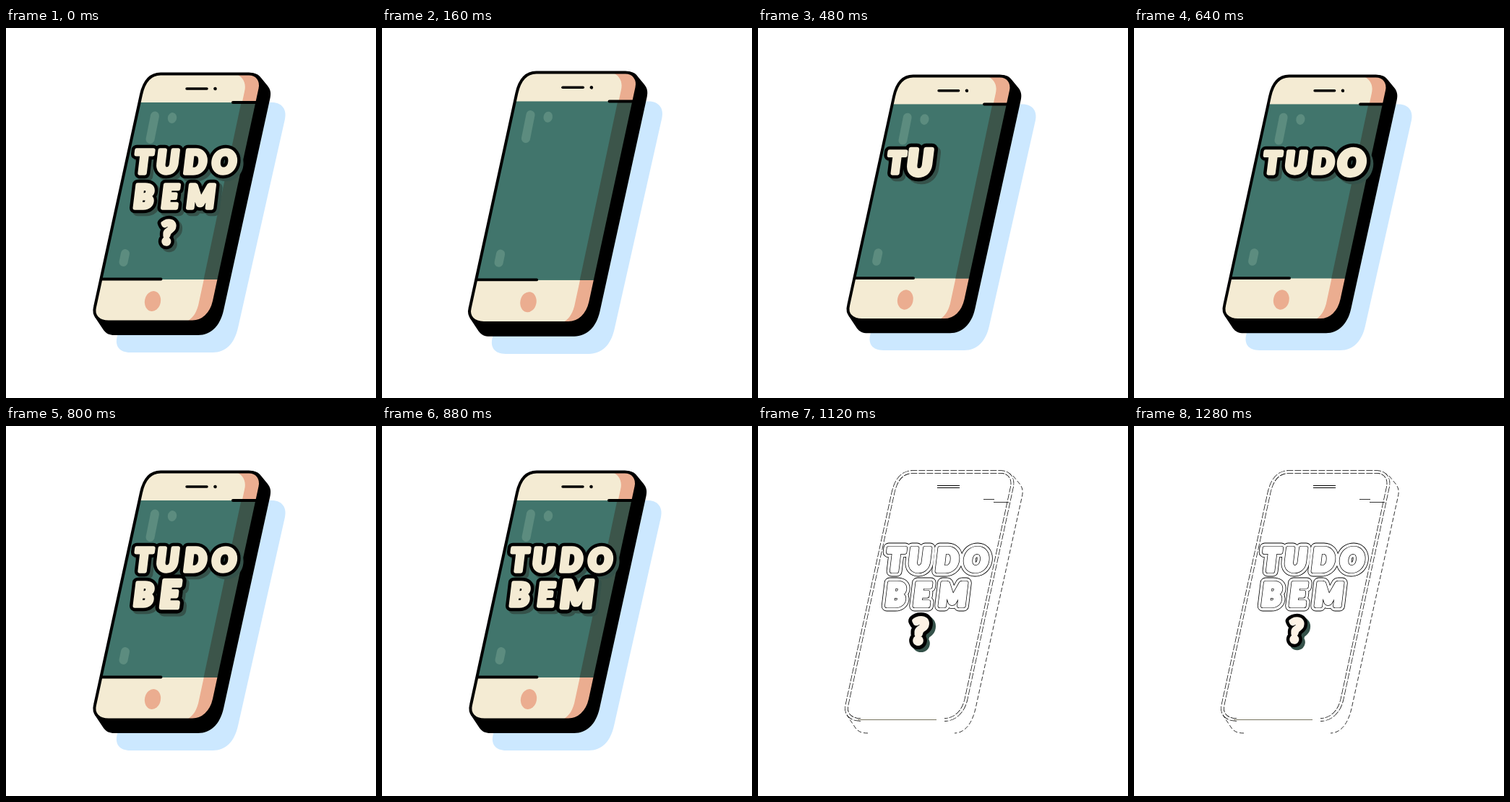
These frames come from a looping animation (512x512 px, 1450 ms). An HTML page with a canvas:

```html
<!DOCTYPE html>
<html lang="pt">
<head>
<meta charset="utf-8">
<title>Tudo bem?</title>
<style>
html, body { margin: 0; width: 100%; height: 100%; overflow: hidden; background: #fff; }
canvas { display: block; width: 512px; height: 512px; }
</style>
</head>
<body>
<canvas id="stage" width="512" height="512"></canvas>
<script>
const ctx = document.getElementById('stage').getContext('2d');
const LOOP = 1450, STEP = 80, LAST = 16, SKETCH_FROM = 12;
const CENTER = [254, 255];
const FONT = 'italic 900 43px Lato, "Open Sans", sans-serif';
const C = {
  ink: '#000', cream: '#f4ebd3', salmon: '#ebad90', screen: '#41756c',
  strip: '#3c554a', glint: '#5c8c7f', sky: '#cce8ff', drop: '#35524a'
};

// Size of the whole phone per step; later steps rest at 1
const PULSE = [1, 1.023, 1.01, 0.99, 0.984, 0.984, 0.984, 0.984, 0.984, 1.023];

const LETTERS = [
  ['T', 192, 184.5], ['U', 224.5, 184.5], ['D', 262, 184.5], ['O', 302, 184.5],
  ['B', 191, 232.5], ['E', 228, 232.5], ['M', 270, 232.5], ['?', 225, 283]
];

const EDGE = 'M142 406.5C128 406.5 120 398 123 386L187 92C191 74 200 63.5 214 63.5' +
  'H336C347 63.5 354 72 351.5 84L288 378C284 396 272 406.5 258 406.5';
const shapes = {
  edge: new Path2D(EDGE),
  front: new Path2D(EDGE + 'Z'),
  body: new Path2D('M338 62C345 62 349 64 353 69L362 80C366 85 367 90 365.5 97L301 391' +
    'C296 413 283 425 266 425H150C143 425 139 423 135 418L123 400L200 100Z'),
  side: new Path2D('M353 69L362 80C366 85 367 90 365.5 97L301 391C296 413 285 425 272 425' +
    'M152 425C143 425 139 423 135 418L123 400'),
  shadow: new Path2D('M345 103H368C382 103 389 113 386 126L321 415C316 437 304 449 286 449' +
    'H172C157 449 150 440 154 426L200 200Z'),
  shade: new Path2D('M314 62C328 66 333 76 330 88L266 384C262 398 256 404 246 408H360V60Z'),
  strip: new Path2D('M325.5 103H360V348H273.5Z'),
  stripSketch: new Path2D('M325 106H346L294 347H274Z')
};

function fill(shape, color) {
  ctx.fillStyle = color;
  ctx.fill(shape);
}

function stroke(shape, color, width) {
  ctx.strokeStyle = color;
  ctx.lineWidth = width;
  ctx.stroke(shape);
}

function line(x1, y1, x2, y2, color, width) {
  stroke(new Path2D(`M${x1} ${y1}L${x2} ${y2}`), color, width);
}

function oval(x, y, rx, ry) {
  const p = new Path2D();
  p.ellipse(x, y, rx, ry, 0.2, 0, Math.PI * 2);
  return p;
}

function letterSize(i, k) {
  if (k === 0) return 1;
  if (i === 0 && k === 4) return 0.18;
  const age = k - 5 - i;
  if (age < 0) return 0;
  if (i === 7) return [0.74, 1.17, 1.12, 1.08][age] || 1;
  return age === 0 ? 1.17 : 1;
}

// Draws one glyph centred on its ink, as a fat outline plus fill
function glyph([ch, x, y], size, color, width, shift = 0) {
  if (!size) return;
  const m = ctx.measureText(ch);
  const dx = (m.actualBoundingBoxLeft - m.actualBoundingBoxRight) / 2;
  const dy = (m.actualBoundingBoxAscent - m.actualBoundingBoxDescent) / 2;
  ctx.save();
  ctx.translate(x + shift, y + shift);
  ctx.scale(size, size);
  ctx.fillStyle = ctx.strokeStyle = color;
  ctx.lineWidth = width;
  ctx.strokeText(ch, dx, dy);
  ctx.fillText(ch, dx, dy);
  ctx.restore();
}

function layer(k, list, color, width, shift) {
  list.forEach(i => glyph(LETTERS[i], letterSize(i, k), color, width, shift));
}

const ALL = LETTERS.map((_, i) => i);

function drawPhone(k) {
  fill(shapes.shadow, C.sky);
  fill(shapes.body, C.ink);

  ctx.save();
  ctx.clip(shapes.front);
  fill(shapes.front, C.cream);
  fill(shapes.shade, C.salmon);
  ctx.fillStyle = C.screen;
  ctx.fillRect(100, 103, 270, 245);
  fill(shapes.strip, C.strip);
  ctx.restore();

  line(206, 121.5, 199.5, 154, C.glint, 12);
  line(165, 312, 162.5, 324, C.glint, 12);
  fill(oval(230, 124.5, 6.2, 7.5), C.glint);
  fill(oval(203, 378, 11, 14), C.salmon);

  line(250, 84, 278, 84, C.ink, 3.5);
  fill(oval(289.5, 84, 2.3, 2.3), C.ink);
  line(314, 103, 347, 103, C.ink, 4);
  line(132, 347.5, 214.5, 347.5, C.ink, 3.8);
  stroke(shapes.front, C.ink, 4);

  layer(k, ALL, C.drop, 14.5, 4);
  layer(k, ALL, C.ink, 14.5);
  layer(k, ALL, C.cream, 5.5);
}

// Bare contour lines on white
function drawSketch(k) {
  const first = k === SKETCH_FROM;
  const words = ALL.slice(0, 7);

  ctx.lineCap = 'butt';
  ctx.setLineDash([9, 2]);
  stroke(shapes.edge, C.ink, 4.6);
  ctx.setLineDash([]);
  stroke(shapes.edge, '#fff', 3.2);
  ctx.setLineDash([6, 3]);
  stroke(shapes.side, C.ink, 0.8);
  ctx.setLineDash([]);

  line(248, 82.5, 279, 82.5, C.ink, 1);
  line(248, 85.5, 279, 85.5, C.ink, 1);
  line(312, first ? 104.5 : 101.5, 327, first ? 104.5 : 101.5, C.ink, 0.8);
  line(326, 105.5, 347, 105.5, C.ink, 0.8);

  if (first) {
    fill(shapes.stripSketch, C.strip);
    line(134, 345.5, 216, 345.5, C.ink, 1);
    stroke(oval(203, 378, 11, 14), '#f3d9cf', 0.8);
    line(330, 82, 326, 103, '#dddddd', 0.7);
    line(273, 350, 266, 384, '#dddddd', 0.7);
    layer(k, words.slice(0, 4), C.strip, 14, 3);
    layer(k, [6], C.screen, 14.5, 5);
  } else {
    line(138, 406.5, 247, 406.5, '#77735f', 1);
  }

  layer(k, words, C.ink, 14.8);
  layer(k, words, '#fff', 13.2);
  layer(k, words, C.ink, 6.2);
  layer(k, words, '#fff', 4.8);
  if (first) {
    layer(k, [6], C.ink, 14.5);
    layer(k, [6], '#fffaf2', 5.5);
  }

  layer(k, [7], C.drop, 14.5, 4);
  layer(k, [7], C.ink, 14.5);
  layer(k, [7], first ? C.cream : '#fdf3e6', 5.5);
}

function draw(now) {
  const k = Math.min(LAST, Math.floor((now % LOOP) / STEP));
  const size = PULSE[k] || 1;
  ctx.setTransform(1, 0, 0, 1, 0, 0);
  ctx.fillStyle = '#fff';
  ctx.fillRect(0, 0, 512, 512);
  ctx.translate(...CENTER);
  ctx.scale(size, size);
  ctx.translate(-CENTER[0], -CENTER[1]);
  ctx.font = FONT;
  ctx.lineJoin = ctx.lineCap = 'round';
  (k < SKETCH_FROM ? drawPhone : drawSketch)(k);
}

const start = performance.now();
function tick() {
  draw(performance.now() - start);
  requestAnimationFrame(tick);
}
tick();
</script>
</body>
</html>
```
